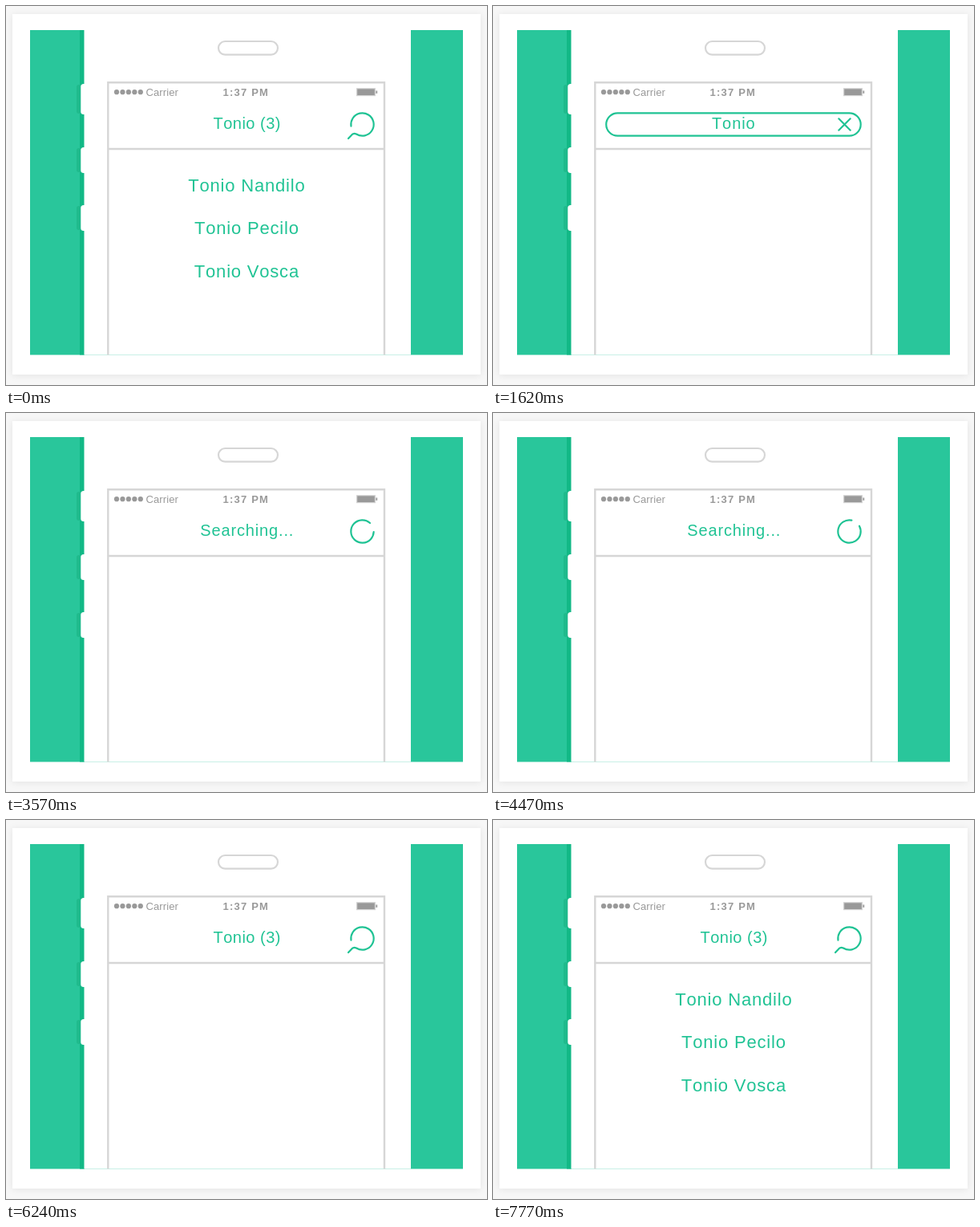
An HTML page for the animation above (8.88 s loop, 600x472 px).

```html
<!DOCTYPE html>
<html lang="en">
<head>
<meta charset="utf-8">
<title>Search</title>
<style>
  html, body { margin: 0; width: 100%; height: 100%; overflow: hidden; background: #f7f7f7; }
  svg { display: block; width: 600px; height: 472px; font-family: "Liberation Sans", sans-serif; font-kerning: none; }
  .card { fill: #fff; filter: drop-shadow(0 1px 4px rgba(0, 0, 0, .08)); }
  .grey { fill: none; stroke: #d6d6d6; stroke-width: 2.4; }
  .status { fill: #999; font-size: 13px; }
  .line { fill: none; stroke: #20c394; stroke-width: 2.2; stroke-linecap: round; }
  .title, .list { fill: #20c394; text-anchor: middle; }
  .title { font-size: 20px; }
  .list { font-size: 22px; letter-spacing: .8px; }
</style>
</head>
<body>
<svg viewBox="0 0 600 472">
  <rect class="card" x="8" y="10" width="584" height="449"/>
  <rect x="30" y="30" width="540" height="404.5" fill="#29c69b"/>
  <rect x="92" y="30" width="6" height="404.5" fill="#12b886"/>
  <rect x="97.5" y="30" width="407.5" height="404.5" fill="#fff"/>
  <g id="buttons"></g>
  <rect class="grey" x="265" y="44" width="74" height="16.6" rx="8.3" style="stroke-width:2.2"/>
  <path class="grey" d="M127.3 434.5V95.2H472V434.5M127 178H472"/>

  <g class="status">
    <g id="signal"></g>
    <text x="174.5" y="111.7" letter-spacing=".1">Carrier</text>
    <text x="270.6" y="111.7" font-weight="bold" letter-spacing="1.2">1:37 PM</text>
    <rect x="437" y="102.2" width="24" height="10" fill="#d0d0d0"/>
    <rect x="438.3" y="103.4" width="21.4" height="7.6"/>
    <rect x="461.4" y="105.5" width="1.8" height="3.4"/>
  </g>

  <text id="result" class="title" x="300.7" y="153.4" letter-spacing=".5">Tonio (3)</text>
  <text id="query" class="title" x="300.3" y="153.4" letter-spacing=".95">Tonio</text>
  <text id="busy" class="title" x="300.8" y="153.4" letter-spacing=".85">Searching...</text>

  <g id="list" class="list">
    <text x="300.4" y="231">Tonio Nandilo</text>
    <text x="300.4" y="284.3">Tonio Pecilo</text>
    <text x="300.4" y="337.5">Tonio Vosca</text>
  </g>
  <path id="sweep" class="line" style="stroke-linecap:butt" opacity=".5"/>

  <circle id="tap" cx="444.5" cy="147.5" fill="#20c394"/>
  <rect id="pill" class="line" y="133.3" height="28.4" rx="14.2"/>
  <path id="cross" class="line" d="M431.3 140.3l14.4 14.4m0-14.4l-14.4 14.4"/>
  <path id="icon" class="line"/>
</svg>
<script>
const LOOP = 8880;
const CX = 444.5, CY = 147.5, R = 14.2;
const PILL_LEFT = 141.2, RIGHT = CX + R;
const $ = id => document.getElementById(id);
const set = (id, attrs) => {
  for (const k in attrs) $(id).setAttribute(k, attrs[k]);
};

// Progress of t from a to b, limited to 0..1
const ramp = (t, a, b) => Math.min(1, Math.max(0, (t - a) / (b - a)));
const inOut = p => p < .5 ? 4 * p ** 3 : 1 - 4 * (1 - p) ** 3;
const window_ = (t, a, b, c, d) => ramp(t, a, b) - ramp(t, c, d);

$('buttons').innerHTML = [[97, 38], [176, 32], [248, 32]].map(([y, h]) =>
  `<rect x="88" y="${y + 1}" width="8" height="${h - 2}" rx="3" fill="#1fba8c"/>
   <rect x="93.3" y="${y}" width="10" height="${h}" rx="3.5" fill="#fff"/>`).join('');
$('signal').innerHTML = [0, 1, 2, 3, 4].map(i =>
  `<circle cx="${138 + i * 7.45}" cy="107.2" r="3.1"/>`).join('');

// Handle first, then the whole ring, counterclockwise
const a = 212 * Math.PI / 180;
const dx = R * Math.sin(a), dy = -R * Math.cos(a);
$('icon').setAttribute('d',
  `M427 165L430.6 161.2Q433.2 157.7 ${CX + dx} ${CY + dy}` +
  `A${R} ${R} 0 0 0 ${CX - dx} ${CY - dy}A${R} ${R} 0 0 0 ${CX + dx} ${CY + dy}`);
const total = $('icon').getTotalLength();
const ring = 2 * Math.PI * R;
const handle = total - ring;
const gap = ring * 52 / 360;

function drawIcon(t) {
  const slide = inOut(ramp(t, 480, 840));
  const open = ramp(t, 2880, 3120);
  const start = handle * (slide - inOut(ramp(t, 6000, 6240)));
  const end = total - gap * (1 - slide + open);
  const turn = 1080 * ramp(t, 3050, 6000);
  set('icon', {
    'stroke-dasharray': `${end - start} 400`,
    'stroke-dashoffset': -start,
    transform: `rotate(${turn} ${CX} ${CY})`,
    visibility: t > 1110 && t < 2880 ? 'hidden' : 'visible'
  });
}

function drawPill(t) {
  const wide = inOut(ramp(t, 1125, 1605)) - inOut(ramp(t, 2400, 2880));
  const x = CX - R + (PILL_LEFT - CX + R) * wide;
  set('pill', {
    x, width: RIGHT - x,
    visibility: t > 1110 && t < 2880 ? 'visible' : 'hidden'
  });
}

function drawSweep(t) {
  const at = p => 128.5 + 342.5 * inOut(p);
  const head = at(ramp(t, 6400, 6720)), tail = at(ramp(t, 6560, 6890));
  const d = [225.5, 279, 332.5].map(y => `M${tail} ${y}H${head}`).join('');
  set('sweep', { d, visibility: head > tail ? 'visible' : 'hidden' });
}

function draw(t) {
  const tap = ramp(t, 240, 600);
  set('tap', { r: 24.5 * (1 - (1 - tap) ** 3), opacity: tap > 0 ? .3 * (1 - tap) : 0 });

  const leave = ramp(t, 630, 1080);
  set('list', {
    opacity: 1 - leave + ramp(t, 7420, 7770),
    transform: `translate(${t < 1110 ? -22 * leave ** 3 : 0})`
  });
  set('result', { opacity: 1 - ramp(t, 840, 1110) + ramp(t, 6000, 6240) });
  const typed = window_(t, 1320, 1620, 2400, 2610);
  set('query', { opacity: typed });
  set('cross', { opacity: typed });
  set('busy', { opacity: window_(t, 2610, 2940, 5720, 5980) });

  drawIcon(t);
  drawPill(t);
  drawSweep(t);
}

const begin = performance.now();
(function tick() {
  draw((performance.now() - begin) % LOOP);
  requestAnimationFrame(tick);
})();
</script>
</body>
</html>
```
